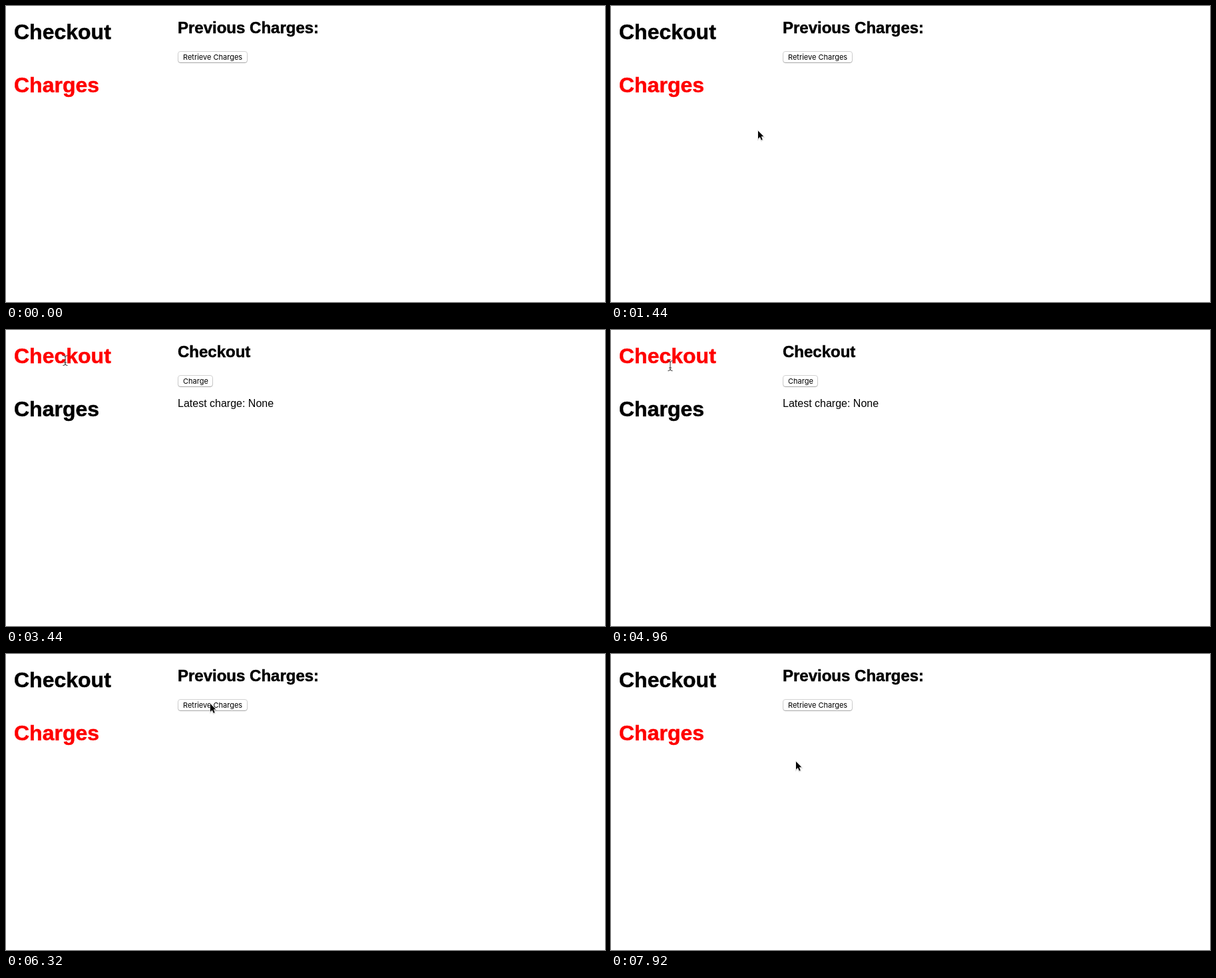
Animation of 900 by 446 pixels, one loop 8 s. Source, as an HTML page:

```html
<!DOCTYPE html>
<html lang="en">
<head>
<meta charset="utf-8">
<title>Checkout</title>
<style>
  html, body { margin: 0; width: 100%; height: 100%; overflow: hidden; background: #fff; }
  svg { display: block; width: 900px; height: 446px; }
  text { font-family: "Liberation Sans", Helvetica, Arial, sans-serif; white-space: pre; }
  .nav, .title { font-weight: bold; stroke: currentColor; fill: currentColor; stroke-width: .5px; }
  .nav { font-size: 32px; }
  .title { font-size: 24px; }
  .body { font-size: 16px; }
  .label { font: 11px Inter, Roboto, sans-serif; }
  .active { color: #f00; }
  .button { fill: #fff; stroke: url(#edge); }
</style>
</head>
<body>
<svg viewBox="0 0 900 446">
  <defs>
    <linearGradient id="edge" x1="0" y1="0" x2="0" y2="1">
      <stop offset="0" stop-color="#d2d2d2"/>
      <stop offset=".8" stop-color="#c6c6c6"/>
      <stop offset="1" stop-color="#a6a6a6"/>
    </linearGradient>
    <path id="arrowShape" d="M0 0V12L2.8 9.3L4.8 14L6.7 13.2L4.8 8.6H8.4Z"/>
  </defs>
  <text id="checkoutNav" class="nav" x="12" y="50">Checkout</text>
  <text id="chargesNav" class="nav" x="12" y="130">Charges</text>
  <g id="checkoutPage">
    <text class="title" x="258" y="41">Checkout</text>
    <rect class="button" x="258.5" y="68.5" width="52" height="17" rx="3.5"/>
    <text class="label" x="266" y="81">Charge</text>
    <text class="body" x="258" y="116">Latest charge: None</text>
  </g>
  <g id="chargesPage">
    <text class="title" x="258" y="41">Previous Charges:</text>
    <rect class="button" x="258.5" y="68.5" width="104" height="17" rx="3.5"/>
    <text class="label" x="266" y="81">Retrieve Charges</text>
  </g>
  <g id="pointer">
    <g id="arrow">
      <use href="#arrowShape" y="1" fill="none" stroke="#000" stroke-opacity=".12" stroke-width="2"/>
      <use href="#arrowShape" stroke="#fff" paint-order="stroke"/>
    </g>
    <path id="beam" d="M-3.5 -7.5Q0 -7.5 0 -5Q0 -7.5 3.5 -7.5M0 -5V5M-3.5 7.5Q0 7.5 0 5Q0 7.5 3.5 7.5M-2 3H2" fill="none" stroke="#333"/>
  </g>
</svg>
<script>
const LOOP = 8000, STEP = 80;
const ENTER = 160, OPEN_CHECKOUT = 3440, OPEN_CHARGES = 5920;

const easeIn = k => k * k;
const easeOut = k => 1 - (1 - k) ** 2;
const easeInOut = k => k * k * (3 - 2 * k);

// The pointer rests between moves.
const entry = { x: 352, y: 344 };
const moves = [
  { from: 80, to: 640, x: 276, y: 254, ease: easeOut },
  { from: 880, to: 1040, x: 270, y: 249, ease: easeOut },
  { from: 1120, to: 1440, x: 221, y: 188, ease: easeIn },
  { from: 1440, to: 2000, x: 97, y: 117, ease: easeOut },
  { from: 2960, to: 3440, x: 89, y: 46, ease: easeInOut },
  { from: 4880, to: 5280, x: 91, y: 122, ease: easeInOut },
  { from: 5840, to: 6320, x: 307, y: 75, ease: easeInOut },
  { from: 6880, to: 7360, x: 278, y: 162, ease: easeInOut }
];

const el = id => document.getElementById(id);
const show = (id, visible) => el(id).setAttribute("display", visible ? "inline" : "none");

function pointerAt(t) {
  let { x, y } = entry;
  for (const move of moves) {
    const k = move.ease(Math.min(1, Math.max(0, (t - move.from) / (move.to - move.from))));
    x += (move.x - x) * k;
    y += (move.y - y) * k;
  }
  return [Math.round(x), Math.round(y)];
}

const inside = (x, y, right, top) => x >= 12 && x <= right && y >= top && y <= top + 37;

function render(time) {
  const t = Math.floor((time % LOOP) / STEP) * STEP;
  const onCheckout = t >= OPEN_CHECKOUT && t < OPEN_CHARGES;
  show("checkoutPage", onCheckout);
  show("chargesPage", !onCheckout);
  el("checkoutNav").classList.toggle("active", onCheckout);
  el("chargesNav").classList.toggle("active", !onCheckout);

  const [x, y] = pointerAt(t);
  const overText = inside(x, y, 158, 20) || inside(x, y, 140, 100);
  show("pointer", t >= ENTER);
  show("arrow", !overText);
  show("beam", overText);
  el("pointer").setAttribute("transform", `translate(${x} ${y})`);
}

const start = performance.now();
function tick() {
  render(performance.now() - start);
  requestAnimationFrame(tick);
}
tick();
</script>
</body>
</html>
```
